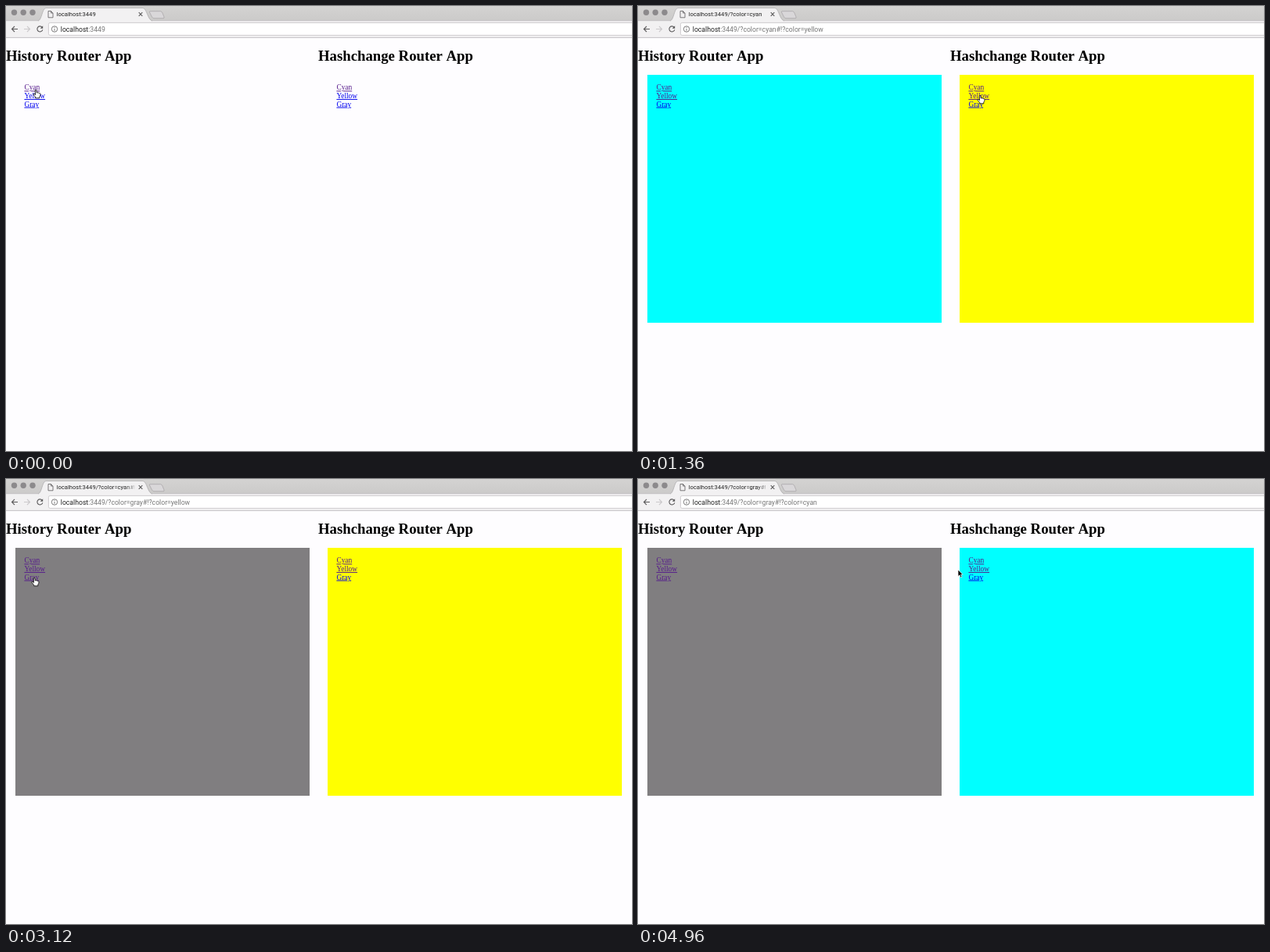
An HTML page for the animation above (5000 ms loop, 800 by 569 pixels).

```html
<!DOCTYPE html>
<html lang="en">
<head>
<meta charset="utf-8">
<title>Router demo</title>
<style>
  html, body { margin: 0; width: 100%; height: 100%; overflow: hidden; background: #fefdff; }
  svg { display: block; width: 800px; height: 569px; }
  .ui { font-family: Roboto, sans-serif; white-space: pre; }
  .page { font-family: "Liberation Serif", serif; }
  .title { font-size: 18.76px; font-weight: bold; font-kerning: none; }
  .link { font-size: 9.38px; text-decoration: underline; }
  .panel { shape-rendering: crispEdges; }
  .line { fill: none; stroke: #5b5a5b; stroke-width: 1.1; }
  .thin { stroke-width: .8; }
</style>
</head>
<body>
<svg viewBox="0 0 800 569">
  <defs>
    <linearGradient id="fade" gradientUnits="userSpaceOnUse" x1="153" x2="167">
      <stop stop-color="#222"/>
      <stop offset="1" stop-color="#222" stop-opacity="0"/>
    </linearGradient>
    <linearGradient id="strip" x2="0" y2="1">
      <stop stop-color="#d4d3d2"/>
      <stop offset="1" stop-color="#cbcac9"/>
    </linearGradient>
  </defs>

  <!-- Browser frame -->
  <rect width="800" height="19" fill="url(#strip)"/>
  <rect y="18.5" width="800" height="22" fill="#f2f1f2"/>
  <path d="M0 18.7H42M186 18.7H800M0 40.4H800" stroke="#b9b7b9" stroke-width=".8"/>
  <path d="M41 19C46 18 46 3 51 2.5H175C180 3 181 18 187 19" fill="#f2f1f2" stroke="#aaa8aa" stroke-width=".7"/>
  <path d="M184 6.7H197.5Q199 6.7 200 9L202 14Q202.5 15.7 201 15.7H189Q187.5 15.7 186.5 14L183.5 8Q183 6.7 184 6.7Z" fill="#d9d7d9" stroke="#a5a3a5" stroke-width=".7"/>
  <g fill="#8c8a8c">
    <circle cx="10.5" cy="8.2" r="3.7"/>
    <circle cx="22.2" cy="8.2" r="3.7"/>
    <circle cx="34" cy="8.2" r="3.7"/>
  </g>
  <path class="line thin" d="M54 6.5H57.5L60 9V14.8H54ZM57.5 6.5V9H60"/>
  <path class="line" d="M169.7 8.2L174.3 12.8M174.3 8.2L169.7 12.8"/>
  <path class="line" d="M15 29.5H7.5M11 26L7.5 29.5L11 33"/>
  <path class="line" style="stroke:#cbc9cb" d="M23 29.5H30.5M27 26L30.5 29.5L27 33"/>
  <path class="line" d="M46.2 27.3A3.5 3.5 0 1 0 46.8 30.3"/>
  <path d="M47.2 25.3V28.8H43.7Z" fill="#5b5a5b"/>
  <rect x="54.4" y="21.4" width="760" height="16" rx="2" fill="#fff" stroke="#c4c2c4" stroke-width=".8"/>
  <circle class="line thin" cx="62" cy="29.5" r="3.7"/>
  <path class="line thin" d="M62 29V31.7M62 27.2V28.1"/>
  <text id="tab" class="ui" x="64.7" y="13.2" font-size="7.6"></text>
  <text class="ui" x="69.8" y="32.5" font-size="8.67" fill="#222">localhost<tspan id="path" fill="#777"></tspan></text>

  <g id="apps" class="page"></g>

  <path id="arrow" d="M0 0V8.6L2 6.8L3.4 10L5 9.3L3.6 6.2H6.2Z" stroke="#fff" stroke-width=".7"/>
  <path id="hand" d="M-.8 .8Q0 -.4 .9 .8L1.3 4Q2.3 3.2 3 4.1Q4 3.5 4.6 4.5Q5.8 4.2 6 5.5Q6 8 4.8 9V10.8H-.3V9.5L-3 6.3Q-3.2 5 -2 5.2L-.5 6.5Z" fill="#fff" stroke="#000" stroke-width=".8"/>
</svg>

<script>
const LOOP = 5000, STEP = 40, TAB_LAG = 480;
const CLICK = { left: 120, right: 1280, leftAgain: 2960, rightAgain: 4560 };
const FILL = { cyan: '#00ffff', yellow: '#ffff00', gray: '#807e80' };
const BLUE = '#0000ee', VISITED = '#551a8b';
const COLUMN = 399;

// Pointer stops: time, x, y
const stops = [
  [0, 38, 107], [160, 38, 107], [400, 577, 152], [560, 491, 169], [760, 480.5, 164],
  [840, 480, 163], [1240, 437, 114], [1720, 437, 114], [2200, 72, 93], [2440, 60, 90],
  [2800, 36, 126], [3360, 36, 126], [3880, 427, 119], [4000, 425.5, 118],
  [4400, 430, 104], [4680, 430, 104], [4960, 409, 116]
];

const byId = id => document.getElementById(id);

function add(tag, attributes, text = '') {
  const node = document.createElementNS('http://www.w3.org/2000/svg', tag);
  for (const name in attributes) node.setAttribute(name, attributes[name]);
  node.textContent = text;
  byId('apps').append(node);
  return node;
}

function makeApp(x, title) {
  add('text', { x, y: 70, class: 'title' }, title);
  const panel = add('rect', { x: x + 11.7, y: 87.8, width: 375.9, height: 317.5, class: 'panel' });
  const links = ['Cyan', 'Yellow', 'Gray'].map((name, i) =>
    add('text', { x: x + 23.4, y: 107.4 + i * 10.55, class: 'link' }, name));
  return { panel, links };
}

function paintApp(app, color, visited) {
  app.panel.setAttribute('fill', FILL[color] || 'none');
  app.links.forEach((link, i) => link.setAttribute('fill', visited[i] ? VISITED : BLUE));
}

const leftColor = t => t < CLICK.left ? '' : t < CLICK.leftAgain ? 'cyan' : 'gray';
const rightColor = t => t < CLICK.right ? '' : t < CLICK.rightAgain ? 'yellow' : 'cyan';

function pathAt(t) {
  const left = leftColor(t), right = rightColor(t);
  return ':3449' + (left && '/?color=' + left) + (right && '#!?color=' + right);
}

function pointerAt(t) {
  const next = stops.findIndex(stop => stop[0] > t);
  if (next < 0) return stops[stops.length - 1].slice(1);
  const [t0, x0, y0] = stops[next - 1], [t1, x1, y1] = stops[next];
  const k = (t - t0) / (t1 - t0), ease = k * k * (3 - 2 * k);
  return [x0 + (x1 - x0) * ease, y0 + (y1 - y0) * ease];
}

function overLink(x, y) {
  const localX = x % COLUMN;
  return localX > 23 && localX < 50 && y > 99 && y < 131;
}

const leftApp = makeApp(0, 'History Router App');
const rightApp = makeApp(COLUMN, 'Hashchange Router App');

function draw(now) {
  const elapsed = now % LOOP, t = elapsed - elapsed % STEP;
  const yellowSeen = t >= CLICK.right;
  paintApp(leftApp, leftColor(t), [true, yellowSeen, t >= CLICK.leftAgain]);
  paintApp(rightApp, rightColor(t), [true, yellowSeen, false]);

  byId('path').textContent = pathAt(t);
  const tabPath = pathAt(t - TAB_LAG), overlong = tabPath.includes('#');
  // Cut the faded title where it reaches the close button
  byId('tab').textContent = 'localhost' + (overlong ? tabPath.slice(0, tabPath.indexOf('#') + 2) : tabPath);
  byId('tab').setAttribute('fill', overlong ? 'url(#fade)' : '#222');

  const [x, y] = pointerAt(t), shown = overLink(x, y) ? 'hand' : 'arrow';
  for (const id of ['hand', 'arrow']) {
    byId(id).setAttribute('transform', `translate(${x} ${y})`);
    byId(id).setAttribute('visibility', id === shown ? 'visible' : 'hidden');
  }
  requestAnimationFrame(draw);
}
requestAnimationFrame(draw);
</script>
</body>
</html>
```
